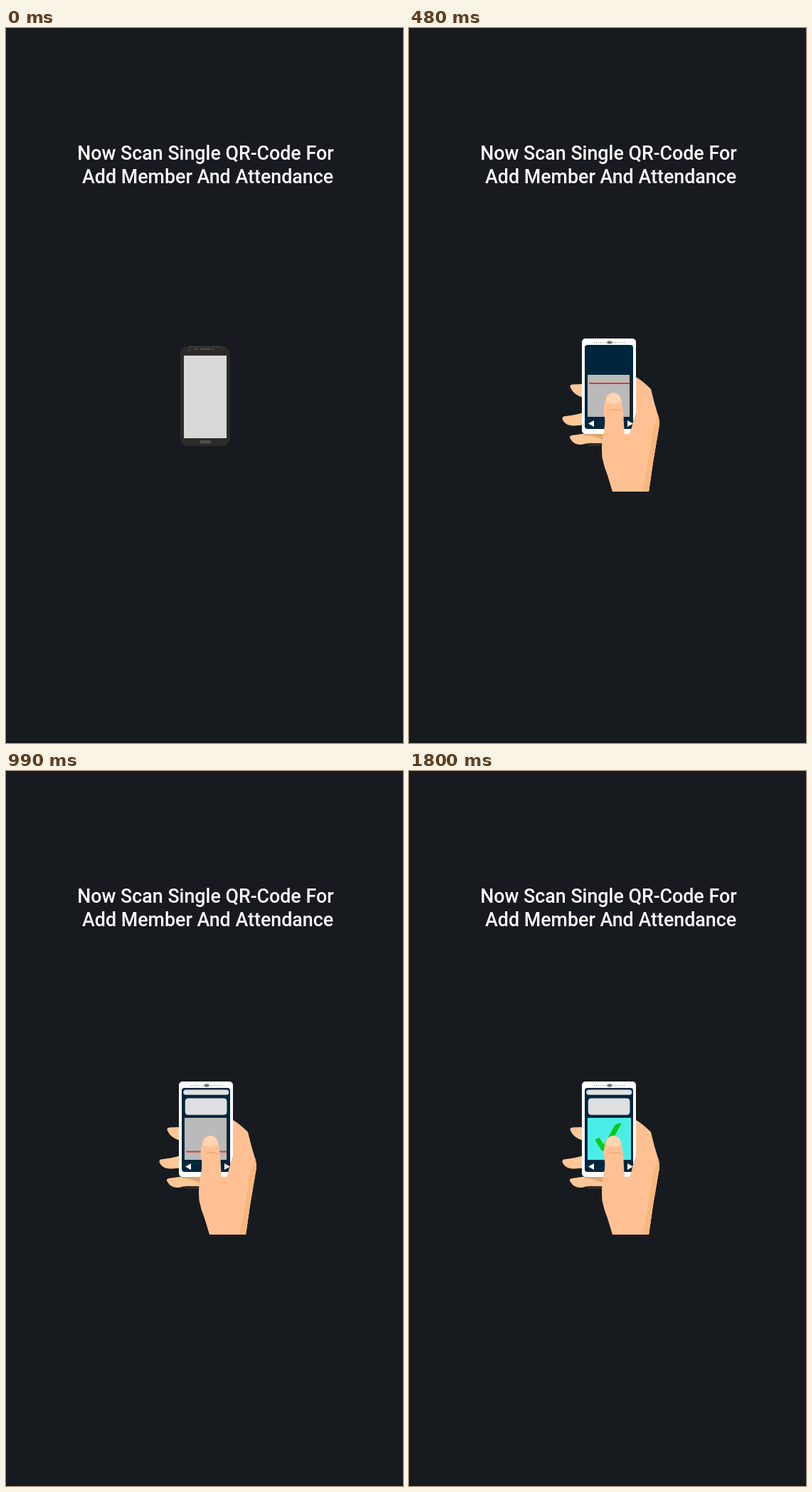
An HTML page with a canvas that plays this animation: 558x1004 px, repeating every 3010 ms.

```html
<!DOCTYPE html>
<html lang="en">
<head>
<meta charset="utf-8">
<title>Scan</title>
<style>
  html, body { margin: 0; width: 100%; height: 100%; overflow: hidden; background: #171b1f; }
  canvas { display: block; }
</style>
</head>
<body>
<canvas id="stage" width="558" height="1004"></canvas>
<script>
const ctx = document.getElementById('stage').getContext('2d');
const LOOP = 3010, STEP = 30, FLOOR = 651;
const SKIN = '#ffc194', SKIN_DARK = '#f8b87d', SKIN_LIGHT = '#ffd4b0', CREASE = '#e39e68';
const FINGER = '#ffc795';

const progress = (t, from, to) => Math.min(1, Math.max(0, (t - from) / (to - from)));
const easeOut = u => 1 - (1 - u) * (1 - u);

function box(x, y, w, h, r, color) {
  ctx.beginPath();
  ctx.roundRect(x, y, w, h, r);
  ctx.fillStyle = color;
  ctx.fill();
}

function shape(path, color) {
  ctx.fillStyle = color;
  ctx.fill(new Path2D(path));
}

function line(path, color, width) {
  ctx.strokeStyle = color;
  ctx.lineWidth = width;
  ctx.stroke(new Path2D(path));
}

function clipBox(x, y, w, h, draw) {
  ctx.save();
  ctx.beginPath();
  ctx.rect(x, y, w, h);
  ctx.clip();
  draw();
  ctx.restore();
}

function drawTitle() {
  ctx.font = '500 26.8px Roboto, sans-serif';
  ctx.fillStyle = '#fff';
  ctx.fillText('Now Scan Single QR-Code For', 100.2, 185);
  ctx.fillText('Add Member And Attendance', 107, 218);
}

function drawBackPhone() {
  box(245, 447, 69.5, 140, 10, '#2d2b2a');
  line('M257 447.3H303', 'rgba(200,210,210,.35)', 0.6);
  box(250, 460, 60, 116, 0, '#d9d9d9');
  box(272, 450, 16, 2, 1, '#55504d');
  box(264, 449.5, 6, 2.5, 1, '#494441');
  box(256, 450.5, 3, 3, 1.5, '#44403e');
  box(290, 449.5, 3, 3, 1.5, '#494441');
  box(272, 579, 16, 4.5, 2, '#574d48');
}

function drawFingers() {
  shape('M245 500L230 500.5Q225 501 227 505Q231 515 245 519Z', FINGER);
  shape('M245 540Q238 542 231 543.5L217 545.5Q214 548 217 552Q222 559 232 558.5L245 557.5Z', FINGER);
  shape('M243 570L229 572Q224 573 227 577Q232 586 243 585Q252 582 261 583L273 583V568Z', FINGER);
  shape('M247 570H273V579Q260 572 247 572Z', '#dba873');
}

function drawSidePalm() {
  shape('M317 489Q327 494 340 507L345 527L351 547Q353 555 351 563L343 610L337 651H300V540Z', SKIN);
}

function drawCameraView(offset, t) {
  clipBox(251, 487, 61, 59, () => {
    ctx.save();
    ctx.translate(0, -offset);
    box(251, 487 + offset, 61, 59, 0, '#4bb3c9');
    ctx.beginPath();
    ctx.ellipse(281, 582, 39, 12, 0, 0, Math.PI * 2);
    ctx.fillStyle = '#318da4';
    ctx.fill();
    drawBackPhone();
    ctx.restore();
    ctx.fillStyle = 'rgba(0,0,0,.14)';
    ctx.fillRect(251, 487, 61, 59);

    if (t > 377 && t < 1440) {
      const y = 544 - 56 * Math.abs(t - 902) / 525;
      box(253, y - 1, 57, 2, 0, 'rgba(222,45,52,.9)');
    }
    ctx.globalAlpha = progress(t, 1440, 1590);
    box(251, 487, 61, 59, 0, '#4beee6');
    ctx.globalAlpha = 1;
  });
  clipBox(262, 494, 38 * progress(t, 1620, 1800), 41, () =>
    shape('M262 519Q262 515 268 515.5L274 525L289 498Q291 494.5 299 494.5L278 532Q275 535 271 533Z', '#0bc81d'));
}

function risingBar(x, y, w, h, r, rise, u) {
  if (u <= 0) return;
  ctx.globalAlpha = Math.min(1, u * 2);
  box(x, y + rise * (1 - easeOut(u)), w, h, r, '#e0e0e2');
  ctx.strokeStyle = '#c5ccd1';
  ctx.lineWidth = 0.6;
  ctx.stroke();
  ctx.globalAlpha = 1;
}

function drawFrontPhone(offset, t) {
  box(243, 436, 76, 134, 5, '#fff');
  for (let x = 260; x <= 302; x += 3) box(x, 441, 1.4, 1.4, 0.7, '#8b8b8b');
  box(278.5, 439.5, 7, 4, 2, '#707070');
  box(247, 445, 68, 118, 4, '#00263d');
  drawCameraView(offset, t);
  risingBar(252, 459.8, 58.2, 22.9, 4, 12, progress(t, 540, 690));
  risingBar(249.5, 447.8, 63.5, 6.7, 3, 18, progress(t, 630, 930));
  shape('M252 555.5L260 551V560Z', '#fff');
  shape('M307 551L315 555.5L307 560Z', '#fff');
}

function drawThumb() {
  shape('M320 538Q315 552 312 565Q310 573 303 573L302 556Q302 541 299.5 528Q298 512 287 512' +
        'Q277 513 275.5 524Q272 535 275 547Q276 558 273 570Q270 585 271.5 603' +
        'Q274 616 279 628L286 651H337L342 616L345 580L330 535Z', SKIN);
  shape('M350 543L351 547Q353 555 351 563L343 610L337 651H327Q335 622 339 590Q341 565 350 543Z', SKIN_DARK);
  shape('M276.5 525Q278 513 287 512Q297 513 298.5 525Q288 530 276.5 525Z', SKIN_LIGHT);
  line('M281 537Q290 534 299 538', CREASE, 1);
  line('M319.5 522Q326 512 338 510', '#f3b382', 0.8);
  line('M320 540Q315 552 312 566', '#f0ae7a', 0.8);
}

function handOffset(t) {
  if (t < 300) return 215 - 230 * (1 - Math.pow(1 - t / 300, 1.085));
  return -15 * (1 - progress(t, 300, 375));
}

function drawHand(t) {
  const offset = handOffset(t);
  clipBox(0, 0, 558, FLOOR, () => {
    ctx.translate(0, offset);
    clipBox(0, 0, 558, FLOOR, () => {
      drawFingers();
      drawSidePalm();
      drawFrontPhone(offset, t);
      drawThumb();
    });
  });
}

function render(now) {
  const t = Math.floor((now % LOOP) / STEP) * STEP;
  box(0, 0, 558, 1004, 0, '#171b1f');
  box(0, 1000, 558, 4, 0, '#15181b');
  drawTitle();
  drawBackPhone();
  if (t > 0) drawHand(t);
}

const start = performance.now();
function tick() {
  render(performance.now() - start);
  requestAnimationFrame(tick);
}
tick();
</script>
</body>
</html>
```
